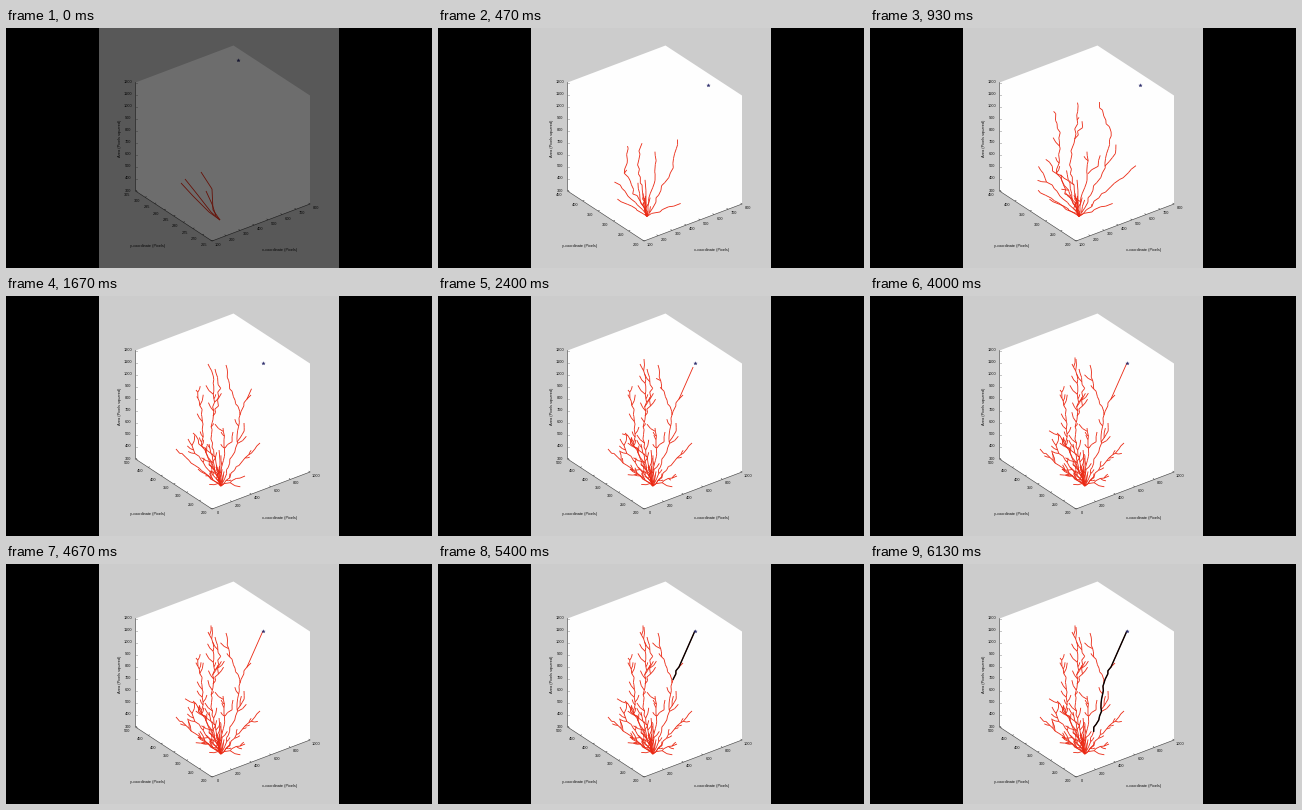
A matplotlib script that plays this animation: 426 by 240 pixels, repeating every 6190 ms.

```python
import numpy as np
import matplotlib.pyplot as plt
from matplotlib.animation import FuncAnimation
from matplotlib.collections import LineCollection

W, H, DPI = 426, 240, 100
FRAMES, LOOP = 93, 6190
PX = 72 / DPI
RED, INK = (0.92, 0.16, 0.08), "#111111"

# Axis limits and tick steps: (first frame, x, y)
VIEWS = [
    (0, (100, 800, 100), (265, 305, 5)),
    (2, (100, 800, 100), (250, 350, 20)),
    (4, (100, 800, 100), (200, 400, 50)),
    (6, (100, 800, 100), (200, 450, 50)),
    (22, (0, 1000, 200), (200, 500, 50)),
]
Z = (300, 1200, 100)
ORIGIN = np.array([206, 213])
EX, EY, EZ = np.array([[98, -37], [-76.5, -50], [0, -108.5]])

rng = np.random.default_rng(12)


def unit(a, lim):
    return (a - lim[0]) / (lim[1] - lim[0])


def project(p, view):
    p = np.asarray(p, float)
    u, v, w = (unit(p[..., k], lim)[..., None]
               for k, lim in enumerate((view[1], view[2], Z)))
    return ORIGIN + u * EX + v * EY + w * EZ


def lift(pts, v, view):
    """Space points that fall on the screen points pts at depth v."""
    x, y = np.asarray(pts, float).T
    u = (x - ORIGIN[0] - v * EY[0]) / EX[0]
    w = (y - ORIGIN[1] - u * EX[1] - v * EY[1]) / EZ[1]
    lims = (view[1], view[2], Z)
    return np.stack([a + c * (b - a)
                     for c, (a, b, _) in zip((u, v, w), lims)], axis=-1)


ROOT = np.array([215, 190])
GOAL = np.array([780, 301, 1128])
JOINT, FORK = (234, 119), (241, 103)


def grown(pts):
    dx, dy = (np.asarray(pts, float) - ROOT).T
    v = 0.247 - 0.6 * dy / 120 - 0.004 * dx
    return lift(pts, v, VIEWS[-1])


def resample(pts, step=4.0, jitter=0.7):
    pts = np.asarray(pts, float)
    s = np.r_[0, np.cumsum(np.hypot(*np.diff(pts, axis=0).T))]
    n = max(2, int(s[-1] / step) + 1)
    t = np.linspace(0, s[-1], n)
    out = np.stack([np.interp(t, s, pts[:, k]) for k in (0, 1)], axis=-1)
    out[1:-1] += rng.normal(0, jitter, (n - 2, 2))
    return out, t


edges, births = [], []


def add(points, born):
    for a, b, t in zip(points[:-1], points[1:], born):
        edges.append((a, b))
        births.append(t)


def sprout(pts, start=0, delay=0, twigs=0.5):
    """Grow a branch and its random side twigs; return its nodes."""
    nodes, s = resample(pts)
    born = 2 + delay + 11 * ((s[1:] + start) / 105) ** 2
    add(grown(nodes), born)
    for i in range(1, len(nodes) - 1):
        if rng.random() > twigs:
            continue
        d = nodes[i + 1] - nodes[i - 1]
        side = rng.choice([-1, 1]) * rng.uniform(0.4, 0.95)
        a = np.arctan2(d[1], d[0]) + side
        size = rng.uniform(4, 12)
        bend = a - 0.4 * side
        mid = nodes[i] + size / 2 * np.array([np.cos(a), np.sin(a)])
        tip = mid + size / 2 * np.array([np.cos(bend), np.sin(bend)])
        t = born[i] + rng.uniform(1, 9) ** 1.6
        add(grown([nodes[i], mid, tip]), [t, t + 2])
    return nodes


R = tuple(ROOT)

# First few edges
for line in ([(214, 192), (205, 184), (191, 166), (179, 151)],
             [(214, 192), (203, 184), (187, 168), (175, 155)],
             [(214, 192), (207, 182), (206, 161), (195, 144)],
             [(210, 188), (206, 176), (200, 163)]):
    dx = np.array(line)[:, 0] - 214
    add(lift(line, 0.225 - 0.0143 * dx, VIEWS[0]), [-1] * 3)

trunk = sprout([R, (219, 180), (224, 166), (231, 148), (232, 132), JOINT])
limb = sprout([JOINT, FORK], 75, 5, 0.2)
sprout([JOINT, (231, 109), (226, 98), (222, 86), (220, 69)], 72, 0, 0.2)
sprout([FORK, (245, 99)], 95, 8, 0)
sprout([R, (210, 165), (205, 142), (207, 120), (208, 100), (207, 80),
        (202, 68)])
sprout([(207, 120), (212, 108), (213, 90), (209, 73)], 75, 2, 0.3)
sprout([R, (203, 165), (196, 146), (197, 128), (195, 112), (190, 94)])
sprout([R, (216, 172), (219, 152), (217, 132)], 0, 1, 0.6)
sprout([(219, 152), (225, 146), (227, 136)], 40, 5)
sprout([R, (200, 178), (185, 167), (170, 153)], 0, 9, 0.35)
sprout([R, (203, 174), (190, 158), (182, 143)], 0, 3)
sprout([R, (208, 172), (198, 152), (187, 137)], 0, 5)
sprout([R, (230, 172), (243, 158), (254, 147)], 0, 7, 0.4)
sprout([R, (228, 184), (239, 180)], 0, 3, 0.6)
sprout([(231, 146), (238, 136), (238, 127)], 48, 4, 0.4)
sprout([R, (210, 178), (206, 160), (203, 148)], 0, 4)
sprout([R, (203, 181), (192, 173)], 0, 2)

edges, births = np.array(edges), np.array(births)
fork = grown([FORK])[0]
path = np.vstack([[GOAL], grown(limb[::-1]), grown(trunk[::-1])[1:]])

plt.rcParams["font.family"] = "Liberation Sans"
fig = plt.figure(figsize=(W / DPI, H / DPI), dpi=DPI, facecolor="black")
ax = fig.add_axes([0, 0, 1, 1])
ax.set_xlim(0, W)
ax.set_ylim(H, 0)
ax.axis("off")

ax.add_patch(plt.Rectangle((93, 0), 239.5, H, fc="#cccccc", lw=0))
corners = [ORIGIN, ORIGIN + EX, ORIGIN + EX + EZ, ORIGIN + EX + EY + EZ,
           ORIGIN + EY + EZ, ORIGIN + EY]
ax.add_patch(plt.Polygon(corners, fc="#fefefe", lw=0))
ax.plot(*np.array([corners[4], corners[5], corners[0], corners[1]]).T,
        color="#444444", lw=0.6 * PX)

tree = LineCollection([], colors=[RED], linewidths=0.85 * PX, zorder=3)
ax.add_collection(tree)
reach, = ax.plot([], [], color=RED, lw=0.85 * PX, zorder=3)
route, = ax.plot([], [], color="black", lw=1.4 * PX, zorder=4)
goal, = ax.plot([], [], ls="", marker="*", ms=3.6 * PX, color="#30306e",
                mew=0.3 * PX, zorder=5)
ticks = LineCollection([], colors=["#444444"], linewidths=0.6 * PX, zorder=2)
ax.add_collection(ticks)
shade = ax.add_patch(plt.Rectangle((0, 0), W, H, fc="black", lw=0, zorder=9))


def label(x, y, s, rotation=0):
    return ax.text(x, y, s, size=3.9 * PX, color=INK, rotation=rotation,
                   ha="center", va="center")


label(141.5, 218.5, "y-coordinate (Pixels)")
label(273.5, 221.5, "x-coordinate (Pixels)")
label(114, 110, "Area (Pixels squared)", rotation=90)

numbers = []


def draw_ticks(view):
    while numbers:
        numbers.pop().remove()
    marks = []
    rules = ((view[1], ORIGIN, EX, (6, 4), (-1.4, -1)),
             (view[2], ORIGIN, EY, (-8, 4), (1.5, -0.6)),
             (Z, ORIGIN + EY, EZ, (-7.5, -0.5), (1.6, 0)))
    for lim, base, axis, off, tick in rules:
        for val in range(lim[0], lim[1] + 1, lim[2]):
            p = base + unit(val, lim) * axis
            marks.append([p, p + tick])
            x, y = p + off
            numbers.append(label(x, y, str(val)))
    ticks.set_segments(marks)


def trace(i, view):
    """Part of the route marked so far, from the goal back to the root."""
    if i < 78:
        return np.empty((0, 2))
    pts = project(path, view)
    s = np.r_[0, np.cumsum(np.hypot(*np.diff(pts, axis=0).T))]
    end = s[1] + 5 * (i - 78)
    return pts[s <= end + 0.5]


def draw(i):
    view = [v for v in VIEWS if v[0] <= i][-1]
    draw_ticks(view)
    tree.set_segments(project(edges[births <= i], view))
    k = np.clip((i - 20) / 18, 0, 1)
    reach.set_data(*project([fork, fork + k * (GOAL - fork)], view).T)
    route.set_data(*trace(i, view).T)
    goal.set_data(*project([GOAL], view).T)
    shade.set_alpha(max(0, 0.57 - 0.1 * i))
    return []


anim = FuncAnimation(fig, draw, frames=FRAMES, interval=LOOP / FRAMES,
                     repeat=True, repeat_delay=0, blit=False)
plt.show()
```
